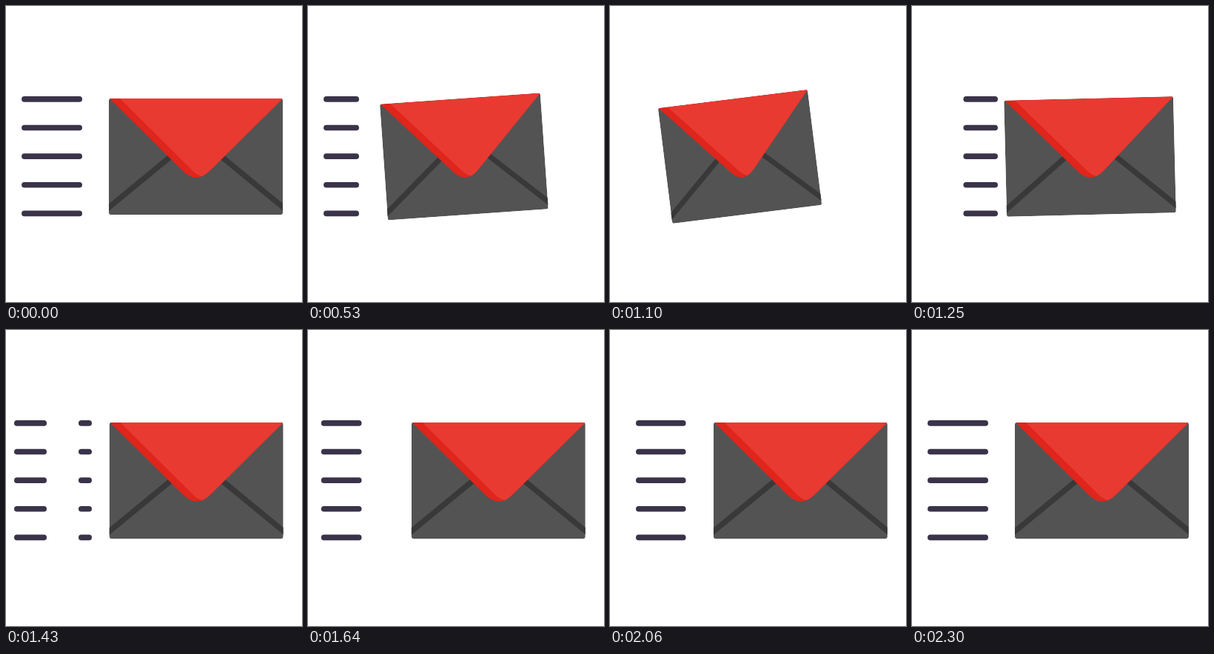
Animation of 400x400 px, one loop 2.33 s. Source, as an HTML page:

```html
<!DOCTYPE html>
<html lang="en">
<head>
<meta charset="utf-8">
<title>Flying envelope</title>
<style>
  html, body { margin: 0; width: 100%; height: 100%; overflow: hidden; background: #fff; }
  svg { display: block; width: 100vw; height: 100vh; }
</style>
</head>
<body>
<svg viewBox="0 0 400 400">
  <defs>
    <clipPath id="body"><rect x="139" y="125" width="235" height="157" rx="3"/></clipPath>
    <clipPath id="flap"><path d="M140 125H374L276 222Q257 241.5 238 222Z"/></clipPath>
  </defs>
  <path id="lines" fill="none" stroke="#3a3349" stroke-width="7.6" stroke-linecap="round"/>
  <g id="mail">
    <g clip-path="url(#body)">
      <rect x="139" y="125" width="235" height="157" fill="#535353"/>
      <path d="M133 277L240 189M380 276.5L273 188.5" stroke="#393939" stroke-width="7.5"/>
      <path d="M140 125H374L276 222Q257 241.5 238 222Z" fill="#df251c"/>
      <path d="M154 125L252 222.500Q259 229.500 268 231V242H376V125Z" fill="#e83a31" clip-path="url(#flap)"/>
    </g>
  </g>
</svg>
<script>
const LOOP = 2330, HOLD = 530, STEP = 30;
const CX = 256.5, CY = 203.5;
const lines = document.getElementById('lines');
const mail = document.getElementById('mail');
const rows = [0, 1, 2, 3, 4].map(i => 125.9 + i * 38.62);

// Linear interpolation through [frame, value] pairs
function track(keys, k) {
  if (k <= keys[0][0]) return keys[0][1];
  for (let i = 1; i < keys.length; i++) {
    const [k0, v0] = keys[i - 1], [k1, v1] = keys[i];
    if (k <= k1) return v0 + (v1 - v0) * (k - k0) / (k1 - k0);
  }
  return keys[keys.length - 1][1];
}

// How far the envelope is pulled back: 0 at rest, 1 at full recoil
function recoil(k) {
  if (k < 1) return 0;
  if (k < 15.3) return 1 - 0.6 * Math.pow(Math.max(0, 15 - k) / 14, 2.7);
  const u = Math.min(1, (k - 15.4) / 12.7);
  return (1 + Math.cos(Math.PI * Math.max(0, u))) / 2;
}

const nudge = [[28, 0], [30, 0.65], [45, 0.9], [54, 0.9], [60, 0]];
const tail = [[21.6, -0.481], [31, 0.626], [45, 2.267], [60, 4.1335]];
const head = [[21.6, 0], [31, 1.107], [45, 2.7536], [60, 4.897]];

// Visible stretch of each speed line, in laps of its track
function stretch(k) {
  if (k < 1) return [0.1335, 0.897];
  if (k < 8) return [0.897 - 0.4145 * Math.pow((8 - k) / 7, 2), 0.897];
  if (k < 21.6) return [0, 0];
  return [Math.max(0, track(tail, k)), track(head, k)];
}

function linePath([a, b]) {
  const at = u => (112.2 - 97.4 * u).toFixed(2);
  let d = '';
  for (let n = Math.floor(a); n < b; n++) {
    const from = Math.max(a, n) - n, to = Math.min(b, n + 1) - n;
    if (to - from < 0.002) continue;
    for (const y of rows) d += `M${at(from)} ${y}H${at(to)}`;
  }
  return d;
}

function draw(ms) {
  const t = ms % LOOP;
  const k = t < HOLD ? 0 : 1 + Math.floor((t - HOLD) / STEP);
  const p = recoil(k);
  const x = CX - 114 * p + track(nudge, k);
  mail.setAttribute('transform',
    `translate(${x} ${CY}) rotate(${-10 * p}) scale(${1 - 0.188 * p} 1) translate(${-CX} ${-CY})`);
  lines.setAttribute('d', linePath(stretch(k)));
}

const start = performance.now();
function tick() {
  draw(performance.now() - start);
  requestAnimationFrame(tick);
}
tick();
</script>
</body>
</html>
```
